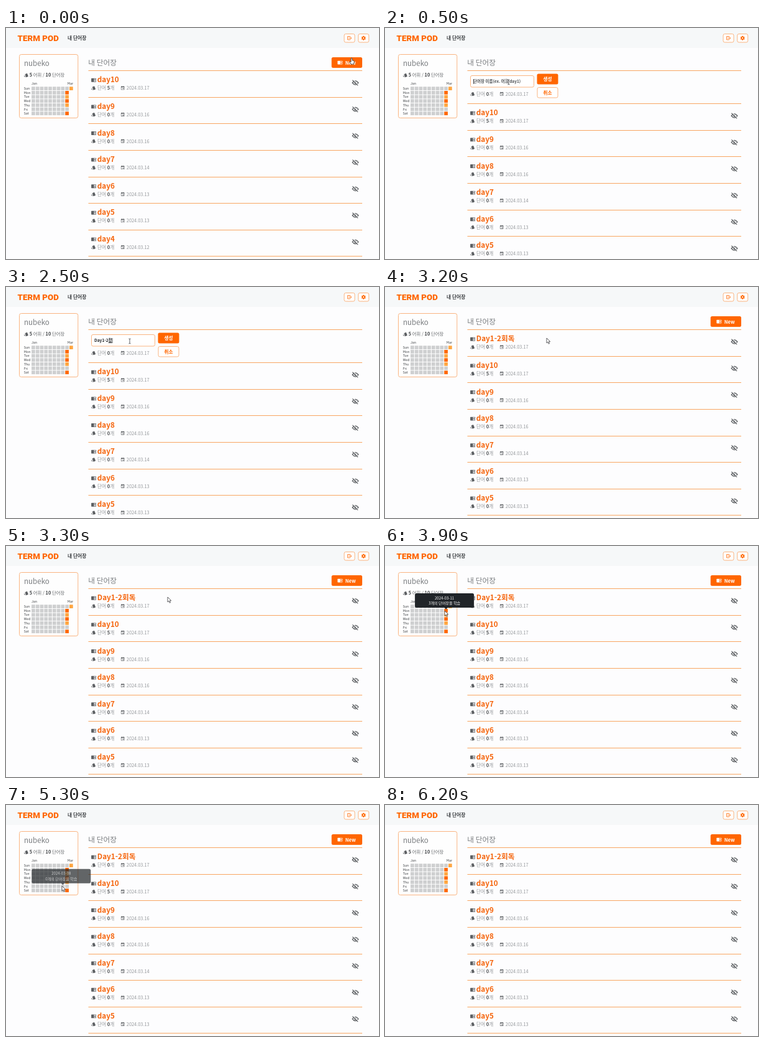
Animation of 600 by 371 pixels, one loop 6.4 s. Source, as an HTML page with a canvas:

```html
<!DOCTYPE html>
<html lang="ko">
<head>
<meta charset="utf-8">
<title>단어장</title>
<style>
html, body { margin: 0; width: 100%; height: 100%; overflow: hidden; background: #fdfdfe; }
canvas { display: block; width: 600px; height: 371px; }
</style>
</head>
<body>
<canvas id="stage"></canvas>
<script>
const W = 600, H = 371, LOOP = 6400, STEP = 100;
const SANS = '"Noto Sans CJK KR", "Noto Sans KR", "Noto Sans CJK JP", "Noto Sans", sans-serif';
const ORANGE = '#ff6600', TITLE = '#f5650d', AMBER = '#ffa640', RULE = '#f8a662', EDGE = '#fab582';
const INK = '#3f4245', HEADING = '#7b7e81', SOFT = '#95989b', ICON = '#5b5e61', CELL = '#cecfd0';
const PAGE = '#fdfdfe';

const FORM_OPEN = 200, FORM_DONE = 3100;
const LIST_TOP = 68.6, ROW_H = 42.6, FORM_H = 53;
const GRID = { x: 41.1, y: 94.3, dx: 6.77, dy: 6.68, size: 5.7 };

const canvas = document.getElementById('stage');
const ctx = canvas.getContext('2d');
const dpr = window.devicePixelRatio || 1;
canvas.width = Math.round(W * dpr);
canvas.height = Math.round(H * dpr);

const words = [
  ['day10', 5, '17'], ['day9', 0, '16'], ['day8', 0, '16'], ['day7', 0, '14'],
  ['day6', 0, '13'], ['day5', 0, '13'], ['day4', 0, '12']
].map(([name, count, day]) => ({ name, count, date: '2024.03.' + day }));
const added = { name: 'Day1-2회독', count: 0, date: '2024.03.17' };

// [time, text, still composing]
const typing = [
  [800, 'D'], [1300, 'Day'], [1600, 'Day1'], [1700, 'Day1-'], [1900, 'Day1-2'],
  [2200, 'Day1-2ㅎ', 1], [2300, 'Day1-2회', 1], [2500, 'Day1-2횓', 1],
  [2600, 'Day1-2회도', 1], [2700, 'Day1-2회독', 1]
];

// [time, x, y, shape from here on]
const pointer = [
  [0, 556, 48, 'hand'], [300, 556, 48, 'arrow'], [500, 199, 87, 'beam'],
  [2800, 199, 87, 'beam'], [2900, 228, 85, 'arrow'], [3000, 260, 82, 'hand'],
  [3200, 260, 82, 'arrow'], [3500, 260, 82, 'arrow'], [3800, 96, 104, 'arrow'],
  [4200, 96, 104, 'arrow'], [4600, 96, 119.5, 'arrow'], [4900, 96, 119.5, 'arrow'],
  [5200, 90, 130, 'arrow'], [6000, 90, 130, null]
];

const tips = [
  { from: 3800, to: 4300, col: 8, row: 1, date: '2024-03-11', count: 3 },
  { from: 4700, to: 5000, col: 8, row: 4, date: '2024-03-14', count: 1 },
  { from: 5300, to: 6000, col: 7, row: 5, date: '2024-03-08', count: 0 }
];

function text(str, x, y, size, color, weight = 400, align = 'left', family = SANS) {
  ctx.font = `${weight} ${size}px ${family}`;
  ctx.fillStyle = color;
  ctx.textAlign = align;
  ctx.fillText(str, x, y);
  return ctx.measureText(str).width;
}

function runs(parts, x, y, size) {
  for (const [str, color, weight] of parts) x += text(str, x, y, size, color, weight);
}

function box(x, y, w, h, r, fill, stroke) {
  ctx.beginPath();
  ctx.roundRect(x, y, w, h, r);
  if (fill) { ctx.fillStyle = fill; ctx.fill(); }
  if (stroke) { ctx.strokeStyle = stroke; ctx.lineWidth = 1; ctx.stroke(); }
}

function rule(y) {
  ctx.fillStyle = RULE;
  ctx.fillRect(132.5, Math.floor(y), 440.5, 1);
}

// Runs a drawing made on a 24-unit square.
function icon(x, y, size, color, draw) {
  ctx.save();
  ctx.translate(x, y);
  ctx.scale(size / 24, size / 24);
  ctx.fillStyle = ctx.strokeStyle = color;
  draw();
  ctx.restore();
}

function strokePath(d, width, color) {
  ctx.lineWidth = width;
  if (color) ctx.strokeStyle = color;
  ctx.stroke(new Path2D(d));
}

function book(x, y, size, color, paper) {
  icon(x, y, size, color, () => {
    box(1, 4, 22, 16.5, 2, color);
    ctx.fillStyle = paper;
    ctx.fillRect(13, 6, 8, 12.5);
    ctx.fillStyle = color;
    for (const line of [8.5, 11.5, 14.5]) ctx.fillRect(13, line, 7, 1.5);
  });
}

function cards(x, y, size) {
  icon(x, y, size, ICON, () => {
    ctx.fill(new Path2D('M4 11V20L2.5 19.5Q.8 18.5 1.5 17ZM6 13.5L9.4 21.8H8Q6 21.8 6 19.8Z'));
    ctx.translate(14, 12.2);
    ctx.rotate(-0.39);
    box(-6, -8.5, 12, 17, 2, ICON);
    ctx.fillStyle = PAGE;
    ctx.fillRect(-4, -6.5, 2, 2);
  });
}

function calendar(x, y, size) {
  icon(x, y, size, ICON, () => {
    ctx.fill(new Path2D(
      'M6 1H8V3H16V1H18V3H19Q21 3 21 5V19Q21 21 19 21H5Q3 21 3 19V5Q3 3 5 3H6Z' +
      'M5 8V19H19V8Z M12 12H17V17H12Z'), 'evenodd');
  });
}

function eyeOff(x, y, size) {
  icon(x, y, size, ICON, () => {
    strokePath('M2 12Q12 -1 22 12Q12 25 2 12Z', 2.6);
    ctx.beginPath();
    ctx.arc(12, 12, 3.6, 0, 7);
    ctx.fill();
    strokePath('M4.5 2L22 19.5', 2.2, PAGE);
    strokePath('M2.5 3.2L20.5 21.2', 2.4, ICON);
  });
}

function logout(x, y, size) {
  icon(x, y, size, ORANGE, () =>
    strokePath('M15 7V4H3V20H15V17M8 12H21M17.5 8L21.5 12L17.5 16', 2.4));
}

function gear(x, y, size) {
  icon(x, y, size, ORANGE, () => {
    ctx.translate(12, 12);
    for (let i = 0; i < 6; i++) {
      ctx.rotate(Math.PI / 3);
      ctx.fillRect(-2.5, -10.5, 5, 6);
    }
    ctx.lineWidth = 4.5;
    ctx.beginPath();
    ctx.arc(0, 0, 5.6, 0, 7);
    ctx.stroke();
  });
}

function header() {
  ctx.fillStyle = '#f6f8f9';
  ctx.fillRect(0, 0, W, 32);
  text('TERM POD', 18.5, 21, 13.4, ORANGE, 900, 'left', 'Roboto, sans-serif');
  text('내 단어장', 99, 19.1, 7.8, INK, 700);
  box(544, 9.5, 17, 13.5, 2.5, '#fffdfb', EDGE);
  logout(548.6, 12.2, 8);
  box(566.7, 9.5, 17, 13.5, 2.5, '#fffdfb', EDGE);
  gear(571.2, 12.2, 8);
}

function cellColor(col, row) {
  if (col === 9 || col === 8 && (row === 2 || row === 4)) return AMBER;
  return col === 8 && [1, 3, 6].includes(row) ? ORANGE : CELL;
}

function profile() {
  box(21.5, 42.5, 94.3, 102, 3, '#fefefe', EDGE);
  text('nubeko', 29, 60.8, 11.6, HEADING, 300);
  cards(28.6, 72, 7.8);
  runs([['5', INK, 700], [' 어휘 / ', '#6a6d70', 400], ['10', INK, 700], [' 단어장', '#6a6d70', 400]], 37.8, 77.5, 7.4);
  text('Jan', 41, 91, 5.3, INK);
  text('Mar', 108, 91, 5.3, INK, 400, 'right');
  ['Sun', 'Mon', 'Tue', 'Wed', 'Thu', 'Fri', 'Sat'].forEach((day, row) => {
    const y = GRID.y + row * GRID.dy;
    text(day, 28.7, y + 4.8, 5.3, INK);
    for (let col = 0; col < (row ? 9 : 10); col++) {
      ctx.fillStyle = cellColor(col, row);
      ctx.fillRect(GRID.x + col * GRID.dx, y, GRID.size, GRID.size);
    }
  });
}

function details(y, count, date) {
  cards(136.8, y - 6.8, 7.8);
  runs([['단어 ', SOFT, 300], [String(count), '#505356', 700], ['개', SOFT, 300]], 147, y, 7.6);
  calendar(184, y - 6.6, 7.4);
  text(date, 193.8, y, 7.4, SOFT, 300);
}

function wordRow(y, { name, count, date }) {
  book(136.8, y + 10.8, 8.6, ICON, PAGE);
  text(name, 146.8, y + 18.7, 11.7, TITLE, 700);
  details(y + 30.8, count, date);
  eyeOff(556.2, y + 13.6, 11.6);
  rule(y + ROW_H);
}

function form(t) {
  box(137.5, 76.5, 102, 18.5, 2.5, '#fff', EDGE);
  const typed = typing.filter(([at]) => at <= t).pop();
  let end = 142;
  if (typed) {
    end += text(typed[1], 142, 88, 6.6, '#25282b', 700);
    ctx.fillStyle = '#25282b';
    if (typed[2]) ctx.fillRect(end - 6, 89.3, 6, 0.8);
  } else {
    text('단어장 이름(ex. 어휘 day1)', 142, 88, 6.5, '#505356', 700);
  }
  ctx.fillStyle = '#25282b';
  ctx.fillRect(end, 82, 0.7, 8);
  box(244.5, 73.5, 34, 17, 2.5, ORANGE);
  text('생성', 261.5, 84.9, 7.7, '#fff', 700, 'center');
  box(245, 95.5, 33, 16.5, 2.5, '#fff', EDGE);
  text('취소', 261.5, 106.7, 7.7, ORANGE, 700, 'center');
  details(108.9, 0, added.date);
  rule(LIST_TOP + FORM_H);
}

function list(t) {
  const editing = t >= FORM_OPEN && t < FORM_DONE;
  text('내 단어장', 132.3, 60.3, 11.7, HEADING, 300);
  rule(LIST_TOP);
  if (editing) {
    form(t);
  } else {
    box(523.7, 47, 49.3, 17, 2.5, ORANGE);
    book(533, 51.2, 8.6, '#fff', ORANGE);
    text('New', 545.8, 58.6, 7.7, '#fff', 700);
  }
  const top = LIST_TOP + (editing ? FORM_H : 0);
  const rows = t >= FORM_DONE ? [added, ...words] : words;
  rows.forEach((row, i) => {
    const y = top + i * ROW_H;
    if (y < 366) wordRow(y, row);
  });
}

function tooltip(t, { from, to, col, row, date, count }) {
  if (t < from || t >= to) return;
  const cx = GRID.x + col * GRID.dx + GRID.size / 2;
  const y = GRID.y + row * GRID.dy;
  const mid = cx - 2.5;
  ctx.globalAlpha = t < from + STEP ? 0.7 : t >= to - STEP ? 0.6 : 1;
  box(mid - 47.5, y - 25, 95, 23, 2.5, '#212529');
  ctx.beginPath();
  ctx.moveTo(cx - 2.6, y - 2.1);
  ctx.lineTo(cx + 2.6, y - 2.1);
  ctx.lineTo(cx, y + 0.6);
  ctx.fill();
  text(date, mid, y - 15.4, 6.1, '#fff', 500, 'center');
  text(`${count}개의 단어장을 학습`, mid, y - 6.8, 6.1, '#fff', 500, 'center');
  ctx.globalAlpha = 1;
}

const shapes = {
  arrow() {
    const path = new Path2D('M0 0V8L1.9 6.3L3.2 9.3L4.6 8.7L3.3 5.8H5.8Z');
    ctx.fillStyle = '#fff';
    ctx.fill(path);
    strokePath(path, 0.8, '#3c3c40');
  },
  hand() {
    const path = new Path2D('M-1 .8Q0 -.6 1 .8V4L3.4 4.6Q4.3 5 4.2 6L3.4 10H-1.2L-3.2 6.6Q-2.6 5.5 -1 6.8Z');
    ctx.fillStyle = '#fff';
    ctx.fill(path);
    strokePath(path, 0.8, '#303034');
  },
  beam() {
    strokePath('M-1.6 -4Q0 -4 0 -3V3Q0 4 -1.6 4M1.6 -4Q0 -4 0 -3M0 3Q0 4 1.6 4', 0.8, '#3c3c40');
  }
};

function cursor(t) {
  let i = pointer.length - 1;
  while (pointer[i][0] > t) i--;
  const [t0, x0, y0, shape] = pointer[i];
  if (!shape) return;
  const [t1, x1, y1] = pointer[i + 1];
  const p = (t - t0) / (t1 - t0);
  const ease = p * p * (3 - 2 * p);
  ctx.save();
  ctx.translate(x0 + (x1 - x0) * ease, y0 + (y1 - y0) * ease);
  shapes[shape]();
  ctx.restore();
}

function draw(now) {
  const t = Math.floor(now % LOOP / STEP) * STEP;
  ctx.setTransform(dpr, 0, 0, dpr, 0, 0);
  ctx.fillStyle = PAGE;
  ctx.fillRect(0, 0, W, H);
  header();
  profile();
  list(t);
  tips.forEach(tip => tooltip(t, tip));
  cursor(t);
}

const start = performance.now();
function tick() {
  draw(performance.now() - start);
  requestAnimationFrame(tick);
}
tick();
</script>
</body>
</html>
```
